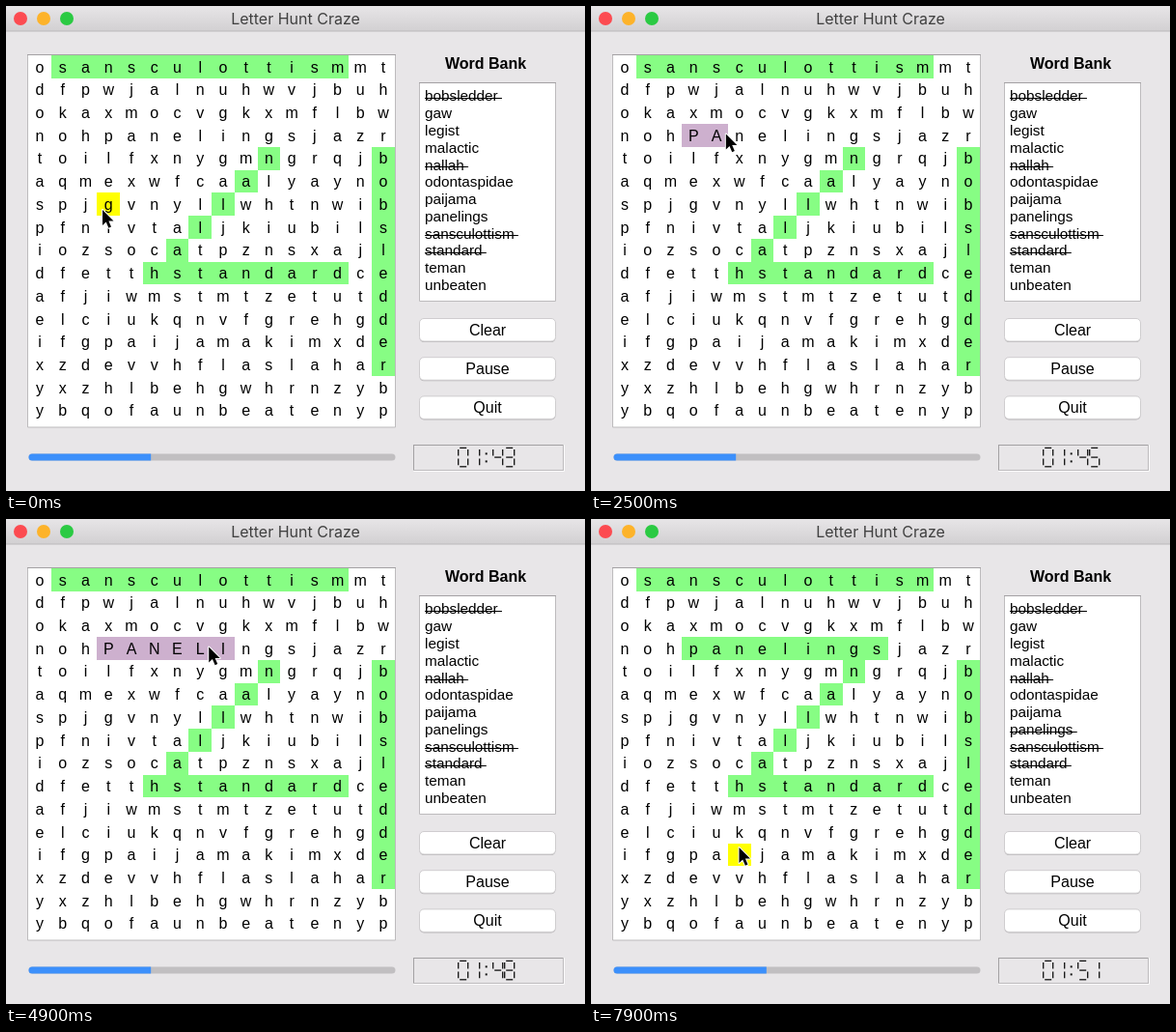
Write an HTML page with a canvas that moves like this. It is 600 px wide and 502 px high and loops after 8 s.

```html
<!DOCTYPE html>
<html lang="en">
<head>
<meta charset="utf-8">
<title>Letter Hunt Craze</title>
<style>
  html, body { margin: 0; width: 100%; height: 100%; overflow: hidden; background: #e8e6e8; }
  canvas { display: block; width: 600px; height: 502px; }
</style>
</head>
<body>
<canvas id="stage" width="600" height="502"></canvas>
<script>
const ctx = document.getElementById('stage').getContext('2d');
const LOOP = 8000, STEP = 100, FIRST_TICK = 600;
const FIRST_CLICK = 1500, CLICK_GAP = 640;
const SANS = '"Liberation Sans", Arial, sans-serif';
const GREEN = '#87fd84', PURPLE = '#cdb0ce', YELLOW = '#ffff00';
const BORDER = '#bdbbbd', DARK = '#a3a1a3', LIGHT = '#fbfafb', BACK = '#e8e6e8';

const GRID_X = 23.2, GRID_Y = 51, CELL = 23.73;
const letters = [
  'osansculottismmt', 'dfpwjalnuhwvjbuh', 'okaxmocvgkxmflbw', 'nohpanelingsjazr',
  'toilfxnygmngrqjb', 'aqmexwfcaalyayno', 'spjgvnyllwhtnwib', 'pfnivtaljkiubils',
  'iozsocatpznsxajl', 'dfetthstandardce', 'afjiwmstmtzetutd', 'elciukqnvfgrehgd',
  'ifgpaijamakimxde', 'xzdevvhflaslahar', 'yxzhlbehgwhrnzyb', 'ybqofaunbeatenyp'
];
const words = ['bobsledder', 'gaw', 'legist', 'malactic', 'nallah', 'odontaspidae',
  'paijama', 'panelings', 'sansculottism', 'standard', 'teman', 'unbeaten'];
const solved = ['bobsledder', 'nallah', 'sansculottism', 'standard'];

// Search the board in all eight directions; returns the cells of the word.
function find(word) {
  for (let r = 0; r < 16; r++) for (let c = 0; c < 16; c++)
    for (let dr = -1; dr <= 1; dr++) for (let dc = -1; dc <= 1; dc++) {
      const cells = [...word].map((_, i) => [r + dr * i, c + dc * i]);
      if (cells.every(([y, x], i) => letters[y]?.[x] === word[i])) return cells;
    }
  return [];
}

const solvedCells = solved.flatMap(find);
const target = find('panelings');

// Letters are clicked in order, except that the "i" comes before "el".
const clicks = [0, 1, 2, 5, 3, 4, 6, 7, 8].map((letter, i) => ({
  cell: target[letter], time: FIRST_CLICK + i * CLICK_GAP
}));
const foundAt = clicks.at(-1).time;

// time, x, y of the pointer tip
const path = [
  [0, 100, 211], [1000, 95.7, 138],
  ...clicks.map(({ cell, time }) => [time, GRID_X + cell[1] * CELL + 8, 132.5]),
  [7000, 291.7, 133], [7700, 158, 352], [7900, 153.5, 340], [LOOP, 153.5, 340]
];

function pointerAt(t) {
  const i = path.findIndex(key => key[0] > t);
  const [t0, x0, y0] = path[i - 1], [t1, x1, y1] = path[i];
  const p = (t - t0) / (t1 - t0);
  const e = (p + p * p * (3 - 2 * p)) / 2;
  return { x: x0 + (x1 - x0) * e, y: y0 + (y1 - y0) * e };
}

function box(x, y, w, h, fill, stroke, r = 0) {
  ctx.beginPath();
  ctx.roundRect(x, y, w, h, r);
  if (fill) { ctx.fillStyle = fill; ctx.fill(); }
  if (stroke) { ctx.strokeStyle = stroke; ctx.lineWidth = 1; ctx.stroke(); }
}

function line(x0, y0, x1, y1, color, width = 1) {
  ctx.beginPath();
  ctx.moveTo(x0, y0);
  ctx.lineTo(x1, y1);
  ctx.strokeStyle = color;
  ctx.lineWidth = width;
  ctx.stroke();
}

function text(str, x, y, font, align = 'center', color = '#000') {
  ctx.font = font;
  ctx.textAlign = align;
  ctx.fillStyle = color;
  ctx.fillText(str, x, y);
}

function panel(x, y, w, h) {
  box(x, y, w, h, '#fff', BORDER);
  line(x - 0.5, y, x + w + 0.5, y, DARK);
}

function drawWindow() {
  const bar = ctx.createLinearGradient(0, 0, 0, 26);
  bar.addColorStop(0, '#e7e5e7');
  bar.addColorStop(1, '#d2d0d2');
  box(0, 0, 600, 502, BACK);
  box(0, 0, 600, 26, bar);
  line(0, 26, 600, 26, '#bbb9bb');
  ['#fc4b51', '#fdb32a', '#2bca43'].forEach((color, i) =>
    box(8 + i * 24, 6, 14, 14, color, null, 7));
  text('Letter Hunt Craze', 300, 19, '16px Inter, sans-serif', 'center', '#404040');
}

function cellColors(t, pointer) {
  const colors = {};
  for (const { cell, time } of clicks) if (t >= time) colors[cell] = PURPLE;
  for (const cell of t >= foundAt ? [...solvedCells, ...target] : solvedCells) colors[cell] = GREEN;
  const hover = [pointer.y - GRID_Y, pointer.x - GRID_X].map(d => Math.floor(d / CELL));
  colors[hover] ??= YELLOW;
  return colors;
}

function drawGrid(t, pointer) {
  const colors = cellColors(t, pointer);
  panel(22.5, 50.5, 381, 385.5);
  letters.forEach((row, r) => [...row].forEach((ch, c) => {
    const color = colors[[r, c]];
    const x = GRID_X + c * CELL, y = GRID_Y + r * CELL;
    if (color) {
      const left = Math.round(x), top = Math.round(y);
      box(left, top, Math.round(x + CELL) - left, Math.round(y + CELL) - top, color);
    }
    text(color === PURPLE ? ch.toUpperCase() : ch, x + CELL / 2, y + 17.5, '16px ' + SANS);
  }));
}

function drawBank(t) {
  text('Word Bank', 497, 65, 'bold 16px ' + SANS);
  panel(428.5, 79.5, 141, 226);
  words.forEach((word, i) => {
    const y = 98.4 + i * 17.78;
    text(word, 434, y, '15.3px ' + SANS, 'left');
    if (solved.includes(word) || (word === 'panelings' && t >= foundAt)) {
      const end = 434 + ctx.measureText(word + ' ').width;
      const mid = Math.round(y - 3.2) + 0.5;
      line(434, mid, end, mid, '#000', 1.2);
    }
  });
}

function drawButtons() {
  ['Clear', 'Pause', 'Quit'].forEach((label, i) => {
    const y = 323.5 + i * 40.2;
    box(428.5, y + 1, 141, 23.5, '#b9b7b9', null, 4.5);
    box(428.5, y, 141, 23.5, '#fff', '#cfcdcf', 4.5);
    text(label, 499, y + 17.2, '16px ' + SANS);
  });
}

function drawProgress(t) {
  const count = solved.length + (t >= foundAt ? 1 : 0);
  box(23.5, 463.5, 380, 7, '#c1bfc1', null, 3.5);
  box(23.5, 463.5, 380 * count / words.length, 7, '#3c90fb', null, [3.5, 0, 0, 3.5]);
}

// Segments 0-5 run clockwise from the top, 6 is the middle bar.
const lit = ['012345', '12', '01346', '01236', '1256', '02356', '023456', '012', '0123456', '012356'];
const corners = [[0, 0], [10, 0], [10, 9.7], [10, 19.4], [0, 19.4], [0, 9.7]];

function drawSegment(x, y, s) {
  const [ax, ay] = corners[s % 6 + (s === 6 ? 5 : 0)];
  const [bx, by] = corners[s === 6 ? 2 : (s + 1) % 6];
  const gx = Math.sign(bx - ax) * 1.5, gy = Math.sign(by - ay) * 1.5;
  line(x + ax + gx, y + ay + gy, x + bx - gx, y + by - gy, '#111', 1.3);
}

function drawClock(t) {
  box(422.5, 454.5, 156, 27, null, LIGHT);
  line(422, 454.5, 578, 454.5, DARK);
  line(422.5, 454, 422.5, 481, DARK);
  line(422, 480.5, 578, 480.5, BORDER);
  line(577.5, 454, 577.5, 481, BORDER);
  const secs = 44 + Math.floor((t - FIRST_TICK) / 1000);
  [...('01:' + secs)].forEach((ch, i) => {
    const x = 468.7 + i * 12, y = 457.4;
    if (ch === ':') [5, 13].forEach(dy => box(x + 4, y + dy, 2, 2, '#111'));
    else for (const s of lit[ch]) drawSegment(x, y, +s);
  });
}

const arrow = new Path2D('M0 0V16L3.7 12.6L6.4 18.8L9 17.6L6.4 11.6H11.5Z');

function drawPointer({ x, y }) {
  ctx.save();
  ctx.translate(x, y);
  ctx.lineJoin = 'round';
  ctx.lineWidth = 2;
  ctx.strokeStyle = '#fff';
  ctx.stroke(arrow);
  ctx.fillStyle = '#000';
  ctx.fill(arrow);
  ctx.restore();
}

function draw(now) {
  const t = Math.floor((now % LOOP) / STEP) * STEP;
  const pointer = pointerAt(t);
  drawWindow();
  drawGrid(t, pointer);
  drawBank(t);
  drawButtons();
  drawProgress(t);
  drawClock(t);
  drawPointer(pointer);
}

const start = performance.now();
function loop() {
  draw(performance.now() - start);
  requestAnimationFrame(loop);
}
loop();
</script>
</body>
</html>
```
